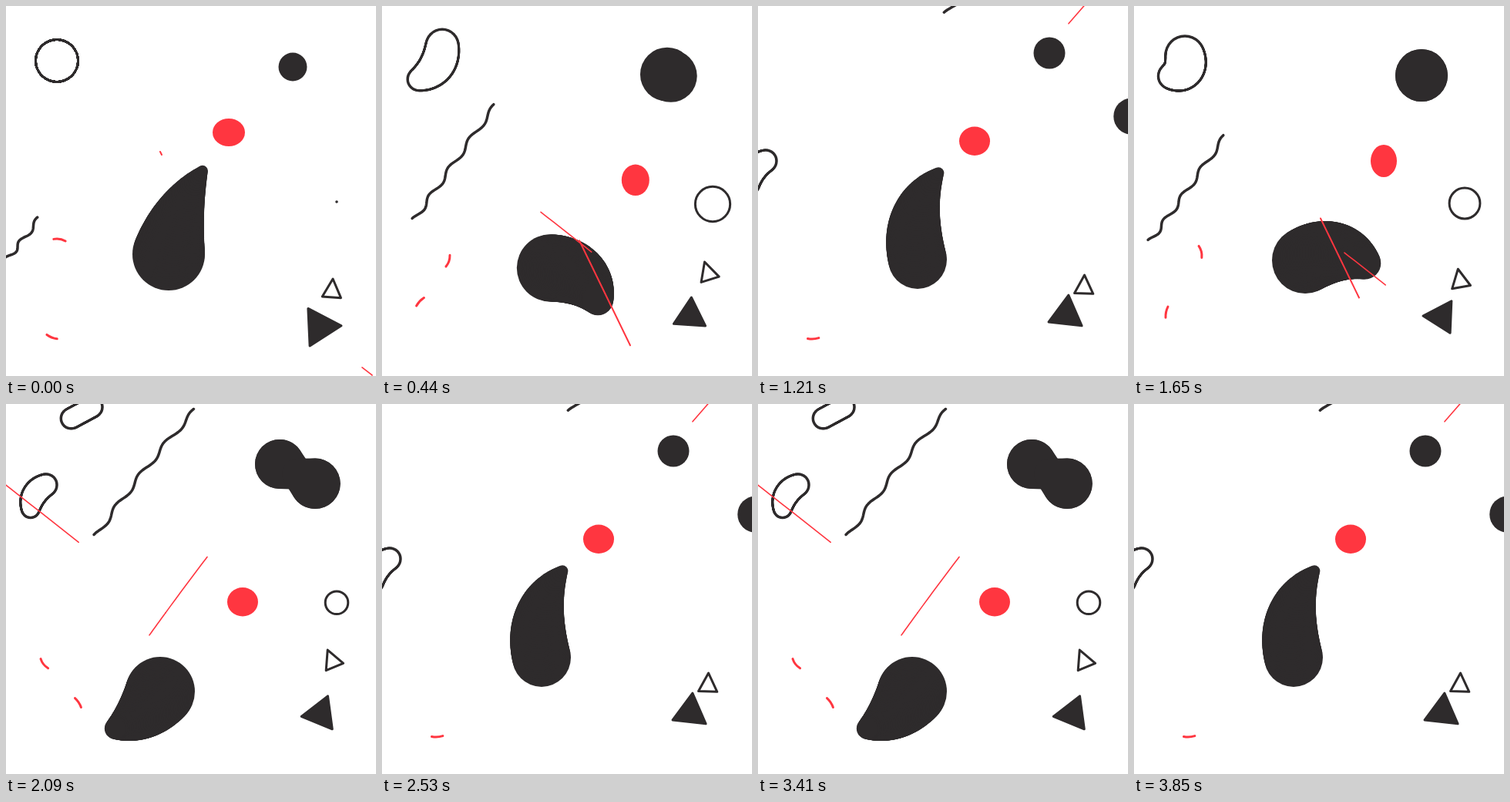
An HTML page with a canvas for the animation above (3.96 s loop, 480 px wide and 480 px high).

```html
<!DOCTYPE html>
<html>
<head>
<meta charset="utf-8">
<title>Drifting shapes</title>
<style>
  html, body { margin: 0; width: 100%; height: 100%; overflow: hidden; background: #fff; }
  canvas { display: block; }
</style>
</head>
<body>
<canvas id="stage" width="480" height="480"></canvas>
<script>
const ctx = document.getElementById('stage').getContext('2d');
const INK = '#2e2b2c', RED = '#ff3640', PAPER = '#fff';
const STEP = 110, STEPS = 12, TAU = Math.PI * 2, LINE = 3.5;
const { sin, cos, max, hypot, atan2, acos } = Math;

// Key poses by step. Beans: angle, x, y, radius, length, tip radius, bend.
const blob = {
  0: [-1.18, 211, 322, 47, 119, 6, -14],
  3: [.06, 222, 330, 43, 79, 20, -26],
  7: [2.46, 200, 373, 45, 77, 13, -14],
  8: [3.42, 200, 356, 29, 72, 26, -28],
  11: [4.96, 207, 329, 38, 118, 6, -32]
};
const loop = {
  0: [2.18, 66, 71, 27, 0, 27, 0],
  3: [2.18, 66, 64, 25, 33, 16, -18],
  5: [2.2, 88, 42, 18, 67, 14, -16]
};
// Angle, x, y, radius.
const wedge = {
  0: [-2.14, 407, 416, 28], 3: [-3.1, 399, 403, 24], 7: [-5.37, 408, 402, 25],
  8: [-6.16, 418, 402, 27], 11: [-7.74, 400, 400, 25]
};
// X, y, radius.
const ball = { 0: [372, 79, 18.5], 3: [373, 90, 34], 7: [355, 78, 32], 8: [343, 73, 28], 11: [378, 61, 20.5] };

// Smooth looping interpolation; the first value gains `turn` on each loop.
function cycle(keys, k, turn = 0) {
  const times = Object.keys(keys).map(Number), n = times.length;
  const time = i => times[(i + n) % n] + STEPS * Math.floor(i / n);
  const value = i => keys[times[(i + n) % n]].map((v, j) => j ? v : v + turn * Math.floor(i / n));
  const i = times.findLastIndex(t => t <= k), near = [i - 1, i, i + 1, i + 2];
  const [t0, t1, t2, t3] = near.map(time), [a, b, c, d] = near.map(value);
  const h = t2 - t1, u = (k - t1) / h;
  return b.map((p, j) => {
    const m1 = (c[j] - a[j]) / (t2 - t0) * h, m2 = (d[j] - p) / (t3 - t1) * h;
    return p + u * (m1 + u * (3 * (c[j] - p) - 2 * m1 - m2 + u * (2 * (p - c[j]) + m1 + m2)));
  });
}

function fill(color) { ctx.fillStyle = color; ctx.fill(); }
function stroke(color, width = LINE) { ctx.strokeStyle = color; ctx.lineWidth = width; ctx.stroke(); }
function circle(x, y, r) { ctx.beginPath(); ctx.arc(x, y, r, 0, TAU); }

function path(point, from, to, count) {
  ctx.beginPath();
  for (let i = 0; i <= count; i++) ctx.lineTo(...point(from + (to - from) * i / count));
}

// A brush of changing radius swept along a bent spine.
function bean([angle, x, y, r, length, tip, bend], color = INK, grow = 0) {
  for (let t = 0; t <= 1; t += .02) {
    const along = length * t, side = 2 * bend * t * (1 - t);
    const radius = r + (tip - r) * t + Math.abs(bend) * t * (1 - t) + grow;
    circle(x + along * cos(angle) - side * sin(angle), y + along * sin(angle) + side * cos(angle), radius);
    fill(color);
  }
}

function outlinedBean(shape) {
  bean(shape, INK, LINE / 2);
  bean(shape, PAPER, -LINE / 2);
}

function triangle(angle, x, y, r, spread = TAU / 3) {
  ctx.beginPath();
  for (const a of [angle, angle + spread, angle - spread]) ctx.lineTo(x + r * cos(a), y + r * sin(a));
  ctx.closePath();
}

// Outer hull of two circles.
function hull([x1, y1, r1], [x2, y2, r2]) {
  const dir = atan2(y2 - y1, x2 - x1), open = acos((r1 - r2) / hypot(x2 - x1, y2 - y1));
  ctx.beginPath();
  ctx.arc(x1, y1, r1, dir + open, dir - open);
  ctx.arc(x2, y2, r2, dir - open, dir + open);
  fill(INK);
}

// One ball buds off another, joined by a thinning neck.
function drawBalls(k) {
  const a = cycle(ball, k);
  circle(...a);
  fill(INK);
  if (k < 3) return;
  const t = k - 3, b = [373 + 1.75 * t * t, 90 + .83 * t * t, 34 - .02 * t ** 3];
  circle(...b);
  fill(INK);
  if (k > 5 && k < 9) {
    const mid = [(a[0] + b[0]) / 2, (a[1] + b[1]) / 2, 10 * (9 - k)];
    hull(a, mid);
    hull(mid, b);
  }
}

// The loop stretches, then splits into two that drift off.
function drawLoops(k) {
  if (k < 6) return outlinedBean(cycle(loop, k));
  const d = k - 7;
  outlinedBean([2.65, 112 + 24 * d, 4 - 13 * d, 13, 32, 13, 0]);
  outlinedBean([2.13, 52 - 10.5 * d, 105 + 16 * d + 2 * d * d, 14, 38, 11, 12]);
}

// Four periods of a widening wave travel along a fixed curve.
function drawWave(k) {
  const point = p => {
    const swing = sin(Math.PI * p) ** 2;
    return [-2 + 18 * p + .98 * p * p + 6 * swing,
      327 - p * (19.5 + 3.05 * p - .145 * p * p) + 2.5 * swing];
  };
  path(point, max(0, k - 1.95), k + 2.1, 80);
  stroke(INK);
}

// A short arc runs around a circle at uneven speed.
function dash(x, y, r, start, ease, half, phase) {
  const a = start + phase - ease * sin(phase);
  ctx.beginPath();
  ctx.arc(x, y, r, a - half, a + half);
  stroke(RED, 3);
}

function streak(from, to, y, width = 1.6) {
  path(x => [x, y(x)], from, to, 8);
  stroke(RED, width);
}

function drawStreaks(k) {
  const falling = x => 479 - (475 - x) * .787;
  const steep = x => 191 + (x - 201) * 2.06;
  const rising = x => 378 - 1.45 * (x - 131) + .00053 * (x - 131) ** 2;
  const d = k - 8;
  if (k < 9) streak(475 - 46 * k - 1.2 * k * k, 462 - 60 * k - k * k, falling);
  if (k < 6) streak(200 + 14 * k, 202 + 30 * k, steep, 2);
  if (k > 6) streak(256 + 49 * d, 337 + 76 * d, rising);
  if (k > 6 && k < 10) streak(131 - 55 * d, 197 - 10 * d, rising);
}

function draw(k) {
  const phase = TAU * k / STEPS, c = cos(phase), s = sin(phase);
  ctx.clearRect(0, 0, 480, 480);
  ctx.lineCap = ctx.lineJoin = 'round';

  bean(cycle(blob, k, TAU));
  drawBalls(k);
  drawLoops(k);
  drawWave(k);

  triangle(...cycle(wedge, k, -TAU));
  fill(INK);
  stroke(INK, 3);
  triangle(-1.75 + .25 * c, 423, 351 + 18 * c + 5 * s, 15, 2.2);
  stroke(INK, 3);
  if (k < 10) {
    circle(429, 256 - 2 * c, max(.3, 23 * sin(Math.PI * k / 9)));
    stroke(INK, 3);
  }

  const squash = cos(2 * phase);
  ctx.beginPath();
  ctx.ellipse(304 - 15 * c + 20 * s, 211 - 47 * c - 10 * s, 19 + 2 * squash, 19.5 - 1.5 * squash, 0, 0, TAU);
  fill(RED);

  if (k < 10) dash(66, 324, 22, -1.4, .42, .36, phase);
  dash(70, 403, 29, 1.95, .17, .25, phase);
  drawStreaks(k);
}

function frame() {
  draw(Math.floor(performance.now() / STEP) % STEPS);
  requestAnimationFrame(frame);
}
frame();
</script>
</body>
</html>
```
